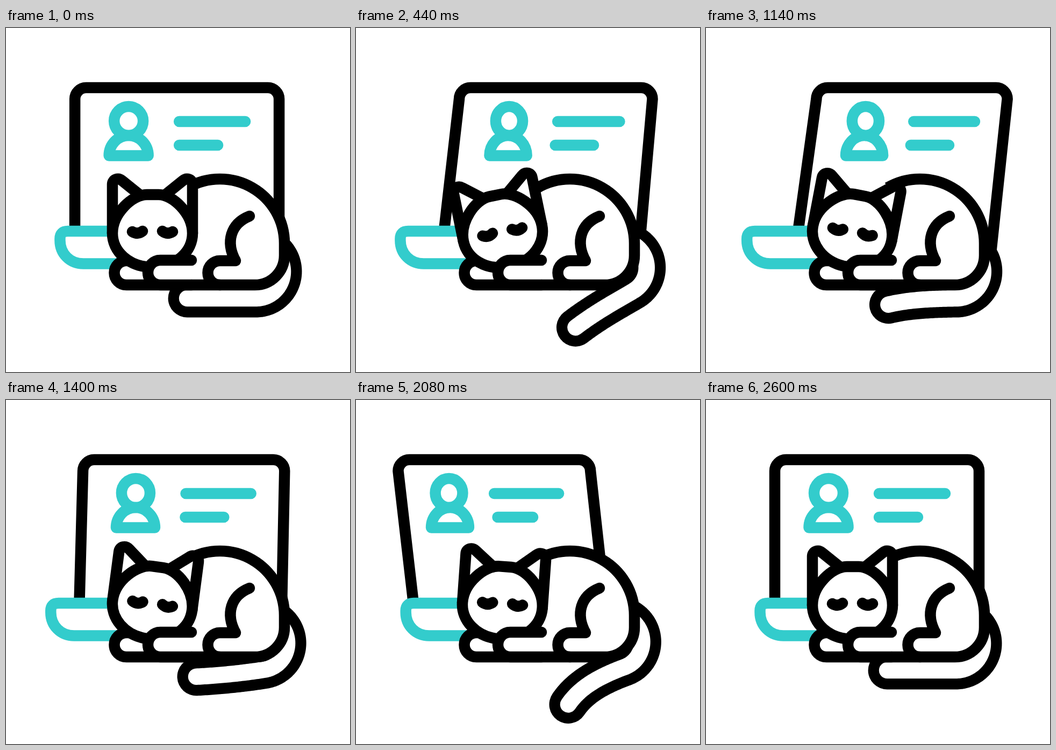
An HTML page that plays this animation: 640x640 px, repeating every 3020 ms.

```html
<!DOCTYPE html>
<html lang="en">
<head>
<meta charset="utf-8">
<title>Cat asleep by a laptop</title>
<style>
  html, body { margin: 0; width: 100%; height: 100%; overflow: hidden; background: #fff; }
  svg { display: block; width: 100vw; height: 100vh; }
  .ink, .teal { fill: none; stroke-width: 20.5; stroke-linecap: round; stroke-linejoin: round; }
  .ink { stroke: #000; }
  .teal { stroke: #3cc; }
  .butt { stroke-linecap: butt; }
  .solid { fill: #fff; }
</style>
</head>
<body>
<svg viewBox="0 0 640 640">
  <path id="screen" class="ink butt"/>
  <path id="base" class="teal butt" d="M230 378H115Q100.500 378 100.500 392V395C100.500 420 119 438.500 144 438.500H230"/>
  <ellipse id="face" class="teal" cy="173" ry="27"/>
  <path id="bust" class="teal"/>
  <path id="bars" class="teal"/>

  <path id="tailEdge" class="ink" style="stroke-width:71"/>
  <path id="tailFill" class="ink" style="stroke-width:30.500;stroke:#fff"/>

  <path class="ink solid butt" d="M338 297A120 120 0 0 1 518 401V423A55 55 0 0 1 463 478H224A22.500 22.500 0 0 1 224 433H260"/>
  <path class="ink" d="M453 350C418 364 408 398 427 433H398A22.500 22.500 0 0 0 398 478"/>

  <g id="head">
    <path class="ink solid" d="M198 382V291C198 281 209 278 216 284L252 313"/>
    <path class="ink solid" d="M347 382V291C347 281 336 278 329 284L293 313"/>
    <path class="ink solid" d="M198 382C198 345 235 310 262 310H284C310 310 347 345 347 382C347 415 318 445 273 445C228 445 198 415 198 382Z"/>
    <path class="ink" d="M235 379Q245 385 254 378M291 378Q300 385 310 379"/>
  </g>
  <path class="ink solid" d="M345 432H287A23 23 0 0 0 287 478H345"/>
</svg>
<script>
const LOOP = 3020;
const REACH = 900, BACK = 1885, END = 2600; // laptop: far right, far left, upright

const el = id => document.getElementById(id);
const set = (id, attrs) => {
  for (const k in attrs) el(id).setAttribute(k, attrs[k]);
};
const clamp = x => Math.min(1, Math.max(0, x));
const cosine = x => (1 - Math.cos(Math.PI * x)) / 2;
const smoother = x => x * x * x * (10 - 15 * x + 6 * x * x);
const between = (t, a, b) => clamp((t - a) / (b - a));

// Quick start to the right, slow turn to the left, then upright.
function sway(t, right, left) {
  if (t < REACH) return right * Math.sin(Math.PI / 2 * t / REACH);
  return right + (left - right) * smoother(between(t, REACH, BACK))
    - left * smoother(between(t, BACK, END));
}

// Head: each turn is [from, to, degrees], added to the ones before.
const TURNS = [[0, 400, -11.6], [800, 1200, 23.6], [1200, 1840, -20], [1840, 2200, 16], [2200, END, -8]];
const tilt = t => TURNS.reduce((sum, [a, b, deg]) => sum + deg * cosine(between(t, a, b)), 0);

// The tail swings down and up twice.
const swing = t => cosine(Math.min(2400, Math.max(0, t)) / 600);

// Walk from the root: half a circle, then a straight end whose bend trails behind.
function tailPath(t) {
  const radius = 50, arc = Math.PI * radius, straight = 127, step = 3;
  let x = 465, y = 403, d = `M${x} ${y}`;
  for (let s = step / 2; s < arc + straight; s += step) {
    const q = Math.max(0, (s - arc) / straight);
    const bend = (37 + 30 * q * q) * swing(t - 120 * q);
    const heading = Math.min(Math.PI, s / radius) - bend * Math.PI / 180;
    x += step * Math.cos(heading);
    y += step * Math.sin(heading);
    d += `L${x.toFixed(2)} ${y.toFixed(2)}`;
  }
  return d;
}

function drawScreen(s) {
  // Each part follows the lean by its own share to the right or left.
  const at = (x, right, left) => x + s * (s > 0 ? right : left);
  const tl = at(128, 1, 1), tr = at(508, 0.68, 1.45);
  const bl = at(128, 0.57, 0.44), br = at(508, 0.29, 0.82);
  set('screen', {
    d: `M${bl} 372L${tl} 132A21 21 0 0 1 ${tl + 21} 111H${tr - 21}A21 21 0 0 1 ${tr} 132L${br} 415`
  });
  const slim = 1.9 * Math.min(1, Math.abs(s) / 60);
  set('face', { cx: at(228, 0.89, 1.11), rx: 27 - slim });
  const cx = at(228, 0.86, 1.07), r = 36.5 - slim;
  set('bust', { d: `M${cx - r} 237.500A${r} 37.500 0 0 1 ${cx + r} 237.500Z` });
  set('bars', {
    d: `M${at(322, 0.83, 1.31)} 174H${at(445, 0.71, 1.37)}`
      + `M${at(322, 0.76, 1.18)} 218H${at(394, 0.75, 1.31)}`
  });
}

function draw(t) {
  drawScreen(sway(t, 92, -57));
  set('base', { transform: `translate(${sway(t, -26, -9)} 0)` });
  set('head', { transform: `rotate(${tilt(t)} 273 380)` });
  const d = tailPath(t);
  set('tailEdge', { d });
  set('tailFill', { d });
}

const start = performance.now();
function tick(now) {
  draw(Math.max(0, now - start) % LOOP);
  requestAnimationFrame(tick);
}
draw(0);
requestAnimationFrame(tick);
</script>
</body>
</html>
```
